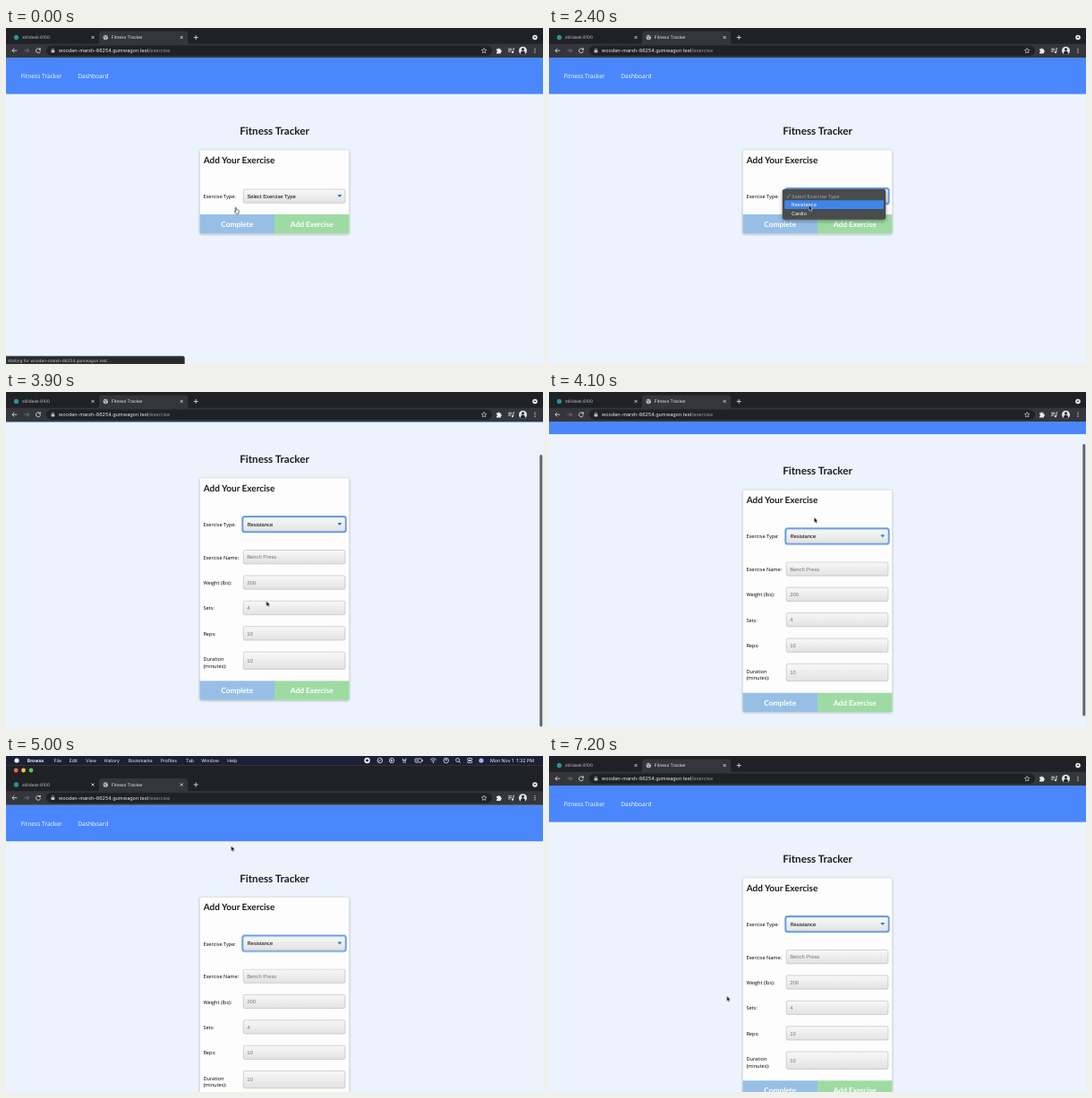
Animation of 600 by 375 pixels, one loop 7300 ms. Source, as an HTML page:

```html
<!DOCTYPE html>
<html lang="en">
<head>
<meta charset="utf-8">
<title>Fitness Tracker</title>
<style>
html, body { margin: 0; width: 100%; height: 100%; overflow: hidden; background: #ecf3fc; }
svg { display: block; width: 600px; height: 375px; text-rendering: geometricPrecision; }

.ui { font-family: Inter, sans-serif; }
.body { font-family: "Open Sans", sans-serif; font-size: 5.6px; }
.head { font-family: Lato, sans-serif; font-weight: 700; }
.ctl { font-family: "Liberation Sans", Arial, sans-serif; font-size: 5.83px; }
.mid { text-anchor: middle; }
.line { fill: none; stroke: #e8eaed; stroke-width: .8; }
.box { fill: url(#face); stroke: #a9a9a9; stroke-width: .5; }

/* One loop is 7300 ms, so 100 ms is 1.37 % */
.anim { animation: 7.3s step-end infinite; }
#win { animation-name: reveal; }
#page { animation-name: scroll; }
#thumb { animation-name: thumb; }
#cursor { animation-name: move; }
#hand { animation-name: hand; }
#arrow { animation-name: arrow; }
#status { animation-name: status; }
#ring { animation-name: ring; }
#popup { animation-name: popup; }
#hover { animation-name: hover; }
#card { animation-name: card; }
#buttons { animation-name: buttons; }
.before { animation-name: before; }
.after { animation-name: after; }

@keyframes move {
  0% { transform: translate(255px, 199.5px); }
  2.73% { transform: translate(262px, 206px); }
  4.1% { transform: translate(262px, 206px); animation-timing-function: steps(8); }
  15.06% { transform: translate(283px, 187px); animation-timing-function: steps(5); }
  21.91% { transform: translate(286px, 190px); }
  23.28% { transform: translate(286px, 190px); animation-timing-function: steps(7); }
  32.87% { transform: translate(290px, 197.5px); }
  34.24% { transform: translate(290px, 197.5px); animation-timing-function: steps(5); }
  41.09% { transform: translate(290.5px, 214px); }
  43.83% { transform: translate(290.5px, 215.5px); animation-timing-function: steps(5); }
  50.68% { transform: translate(290.5px, 233px); }
  53.42% { transform: translate(290.5px, 233px); animation-timing-function: steps(5); }
  60.27% { transform: translate(304px, -.5px); animation-timing-function: steps(2); }
  63.01% { transform: translate(300px, 0); animation-timing-function: steps(4); }
  68.49% { transform: translate(251.2px, 100px); animation-timing-function: steps(2); }
  71.23% { transform: translate(226px, 176px); }
  83.56% { transform: translate(226px, 176px); animation-timing-function: steps(6); }
  91.78% { transform: translate(196px, 274px); }
  94.52% { transform: translate(196px, 274px); animation-timing-function: steps(3); }
  98.63%, 100% { transform: translate(198.3px, 267.5px); }
}
@keyframes scroll {
  0% { transform: none; }
  43.83% { transform: translateY(0); animation-timing-function: steps(2); }
  46.57% { transform: translateY(-22px); animation-timing-function: steps(3); }
  50.68% { transform: translateY(-40px); }
  54.79% { transform: translateY(-40px); animation-timing-function: steps(3); }
  58.9% { transform: translateY(0); }
  60.27% { transform: translateY(1px); }
  61.64%, 100% { transform: none; }
}
@keyframes thumb {
  0% { transform: none; opacity: 0; }
  43.83% { transform: translateY(0); opacity: 0; }
  45.2% { transform: translateY(10px); opacity: 1; animation-timing-function: steps(4); }
  50.68% { transform: translateY(36px); opacity: 1; }
  54.79% { transform: translateY(36px); opacity: 1; animation-timing-function: steps(3); }
  58.9% { transform: translateY(0); opacity: 1; }
  63.01%, 100% { transform: none; opacity: 0; }
}
@keyframes reveal {
  0% { transform: none; }
  60.27% { transform: translateY(0); animation-timing-function: steps(2); }
  63.01% { transform: translateY(21.5px); }
  68.49% { transform: translateY(21.5px); animation-timing-function: steps(2); }
  71.23%, 100% { transform: translateY(0); }
}
@keyframes hand { 0% { opacity: 1; } 6.84%, 100% { opacity: 0; } }
@keyframes arrow { 0% { opacity: 0; } 6.84%, 100% { opacity: 1; } }
@keyframes status { 0% { opacity: 1; } 6.84%, 100% { opacity: 0; } }
@keyframes ring { 0% { opacity: 0; } 17.8%, 100% { opacity: 1; } }
@keyframes popup { 0% { opacity: 0; } 17.8% { opacity: 1; } 36.98% { opacity: .5; } 38.35%, 100% { opacity: 0; } }
@keyframes hover { 0% { opacity: 0; } 26.02% { opacity: 1; } 35.61% { opacity: 0; } 36.98%, 100% { opacity: 1; } }
@keyframes before { 0% { opacity: 1; } 38.35%, 100% { opacity: 0; } }
@keyframes after { 0% { opacity: 0; } 38.35%, 100% { opacity: 1; } }
@keyframes card { 0% { height: 93.5px; } 38.35%, 100% { height: 247.7px; } }
@keyframes buttons { 0% { transform: none; } 38.35%, 100% { transform: translateY(154.2px); } }
</style>
</head>
<body>
<svg viewBox="0 0 600 375">
  <defs>
    <linearGradient id="face" x2="0" y2="1">
      <stop offset="0" stop-color="#f8f8f8"/>
      <stop offset="1" stop-color="#e2e2e2"/>
    </linearGradient>
    <filter id="soft" x="-20%" y="-20%" width="140%" height="140%">
      <feDropShadow dx="0" dy=".7" stdDeviation="1" flood-opacity=".28"/>
    </filter>
    <filter id="deep" x="-20%" y="-40%" width="140%" height="190%">
      <feDropShadow dx="0" dy="2" stdDeviation="2.2" flood-opacity=".35"/>
    </filter>
    <path id="close" class="line" d="M-1.5-1.5l3 3m0-3l-3 3"/>
  </defs>
  <rect width="600" height="375" fill="#ecf3fc"/>

  <g id="win" class="anim">
    <g id="page" class="anim">
      <rect y="33" width="600" height="40.7" fill="#4a87fc"/>
      <g class="body" fill="#fff" style="font-size:6.667px">
        <text x="16.7" y="56.3">Fitness Tracker</text>
        <text x="80.2" y="56.3">Dashboard</text>
      </g>
      <text class="head mid" x="300" y="119" font-size="11.667" fill="#1b1c1d">Fitness Tracker</text>

      <rect id="card" class="anim" x="216.5" y="136" width="167" height="93.5" rx="1.7" fill="#fdfdfd" stroke="#c9cdd2" stroke-width=".4" filter="url(#soft)"/>
      <text class="head" x="220.7" y="150.5" font-size="10" fill="#1b1c1d">Add Your Exercise</text>

      <g class="body">
        <text x="220.4" y="190">Exercise Type:</text>
        <g class="anim after">
          <text x="220.4" y="226.7">Exercise Name:</text>
          <text x="220.4" y="255">Weight (lbs):</text>
          <text x="220.4" y="283.3">Sets:</text>
          <text x="220.4" y="311.6">Reps:</text>
          <text x="220.4" y="340.3">Duration</text>
          <text x="220.4" y="347.9">(minutes):</text>
        </g>
      </g>

      <g class="ctl">
        <rect id="ring" class="anim" x="264.4" y="179.2" width="115.2" height="16.9" rx="2.4" fill="none" stroke="#5c9df0" stroke-width="2.2"/>
        <rect class="box" x="265.2" y="180" width="113.7" height="15.3" rx="1.8"/>
        <path d="M370.3 186.1h5l-2.5 2.9z" fill="#1a7bd8"/>
        <text class="anim before" x="269.4" y="189.8">Select Exercise Type</text>
        <text class="anim after" x="269.4" y="189.8">Resistance</text>
        <g class="anim after" fill="#757575">
          <rect class="box" x="265.2" y="216.5" width="113.7" height="15.3" rx="1.8"/>
          <rect class="box" x="265.2" y="244.9" width="113.7" height="15.3" rx="1.8"/>
          <rect class="box" x="265.2" y="273.3" width="113.7" height="15.3" rx="1.8"/>
          <rect class="box" x="265.2" y="301.7" width="113.7" height="15.3" rx="1.8"/>
          <rect class="box" x="265.2" y="330" width="113.7" height="19.4" rx="1.8"/>
          <text x="269.2" y="226.3">Bench Press</text>
          <text x="269.2" y="254.7">200</text>
          <text x="269.2" y="283.1">4</text>
          <text x="269.2" y="311.5">10</text>
          <text x="269.2" y="341.8">10</text>
        </g>
      </g>

      <g id="buttons" class="anim head mid" font-size="8.333" fill="#fff">
        <path d="M216.5 208H300v21.6h-81.8a1.7 1.7 0 0 1-1.7-1.7z" fill="#97bfe6"/>
        <path d="M300 208h83.5v19.9a1.7 1.7 0 0 1-1.7 1.7H300z" fill="#9edba3"/>
        <text x="258.2" y="222">Complete</text>
        <text x="341.7" y="222">Add Exercise</text>
      </g>
    </g>

    <rect id="thumb" class="anim" x="596.3" y="34" width="3" height="303.5" rx="1.5" fill="#5f6670"/>

    <g id="popup" class="anim ui" font-size="5.45" fill="#fff">
      <rect x="261" y="180" width="115" height="33.6" rx="2.3" fill="#4a4b4d" stroke="#38393b" stroke-width=".4" filter="url(#deep)"/>
      <rect id="hover" class="anim" x="263.2" y="192.2" width="110.8" height="9.7" rx="1" fill="#3d85ea"/>
      <path class="line" d="M265.6 187.9l1.4 1.7 2.4-4.2" style="stroke:#a5a6a8;stroke-width:.7"/>
      <text x="271" y="189.6" fill="#a5a6a8">Select Exercise Type</text>
      <text x="271" y="199.1">Resistance</text>
      <text x="271" y="208.7">Cardio</text>
    </g>

    <!-- Menu bar and window buttons, above the stage until revealed -->
    <g class="ui" transform="translate(0 -21.5)" font-size="5.1" fill="#f1f2f5">
      <rect y="-4" width="600" height="14.8" fill="#1b2038"/>
      <rect y="10.5" width="600" height="12" fill="#202124"/>
      <circle cx="12" cy="5" r="2.6"/>
      <text x="23.8" y="6.9" font-weight="700">Browse</text>
      <text x="53.5" y="6.9">File</text>
      <text x="70.7" y="6.9">Edit</text>
      <text x="89" y="6.9">View</text>
      <text x="109.6" y="6.9">History</text>
      <text x="136.7" y="6.9">Bookmarks</text>
      <text x="172.7" y="6.9">Profiles</text>
      <text x="201" y="6.9">Tab</text>
      <text x="218.3" y="6.9">Window</text>
      <text x="247.2" y="6.9">Help</text>
      <text x="541" y="6.9" font-size="5.3" xml:space="preserve">Mon Nov 1  1:32 PM</text>
      <circle cx="403.5" cy="5" r="3.2"/>
      <rect x="402.2" y="3.7" width="2.6" height="2.6" rx=".5" fill="#1b2038"/>
      <g class="line">
        <circle cx="417.8" cy="5" r="2.8"/><path d="M416 6.3l3.6-2.6"/>
        <circle cx="431" cy="5" r="2.7"/><path d="M430.3 3.8l1.7 1.2-1.7 1.2z"/>
        <path d="M443.3 2.5v2h3.6v-2m-2.8 2v3.4m2 0V4.5"/>
        <rect x="457" y="3" width="7.5" height="4" rx="1"/><path d="M465.6 4.2v1.6M458.4 5h3"/>
        <path d="M474 4q3.4-3 6.8 0m-5.4 1.5q2-1.7 4 0"/>
        <circle cx="491.7" cy="5" r="2.8"/><circle cx="491.7" cy="4.2" r=".8"/>
        <circle cx="504.6" cy="4.5" r="2"/><path d="M506 6l1.8 1.8"/>
        <rect x="515.6" y="2.5" width="5.2" height="2" rx="1"/><rect x="515.6" y="5.6" width="5.2" height="2" rx="1"/>
      </g>
      <circle cx="477.4" cy="7.1" r=".8"/>
      <circle cx="531" cy="5" r="2.6" fill="#a9b4dc"/>
      <circle cx="11.2" cy="16" r="2.4" fill="#ec6a5e"/>
      <circle cx="19.5" cy="16" r="2.4" fill="#f4be4f"/>
      <circle cx="28" cy="16" r="2.4" fill="#61c554"/>
    </g>

    <!-- Tabs and toolbar -->
    <g class="ui" fill="#e8eaed">
      <rect width="600" height="33" fill="#202124"/>
      <path d="M101 18q3 0 3-3V6.500q0-3 3-3h93q3 0 3 3V15q0 3 3 3z" fill="#35363a"/>
      <rect y="17.700" width="600" height="15.300" fill="#35363a"/>
      <rect x="45" y="19.400" width="498" height="11.600" rx="5.800" fill="#202124"/>
      <circle cx="11.500" cy="10.500" r="2.700" fill="#2a8f9c"/>
      <text x="18" y="12.300" font-size="4.850" fill="#bdc1c6">stilldesk:8100</text>
      <circle cx="111.300" cy="10.500" r="2.700" fill="#bdc1c6"/>
      <path d="M109.300 9.600q1.800-.2 1.700 1t1 1.800m.2-4.100q-.4 1.300 1.400 1.300" fill="none" stroke="#35363a" stroke-width=".7"/>
      <text x="117.800" y="12.300" font-size="4.850">Fitness Tracker</text>
      <use href="#close" x="97" y="10.500"/>
      <use href="#close" x="196.200" y="10.500"/>
      <path class="line" d="M209.700 10.500h5m-2.500-2.500v5"/>
      <circle cx="591" cy="10.500" r="2.800"/>
      <path d="M589.500 9.800h3l-1.500 1.800z" fill="#202124"/>

      <path class="line" d="M12.300 25.200H7m2.300-2.400L6.900 25.200l2.400 2.400"/>
      <path class="line" d="M20.300 25.200h5.300m-2.300-2.400l2.400 2.400-2.400 2.400" style="stroke:#7c7f84"/>
      <path class="line" d="M37.900 23.600a2.500 2.500 0 1 0 .6 1.900"/>
      <path d="M38.700 22.100v2.500h-2.500z"/>
      <rect x="50.500" y="24.600" width="3.800" height="2.900" rx=".4" fill="#bdc1c6"/>
      <path class="line" d="M51.300 24.800v-1a1.100 1.100 0 0 1 2.200 0v1" style="stroke:#bdc1c6;stroke-width:.6"/>
      <text x="58.800" y="27.200" font-size="5.500">wooden-marsh-86254.gumwagon.test<tspan fill="#9aa0a6">/exercise</tspan></text>

      <path class="line" d="M534.200 22.400l.8 1.900 2 .2-1.500 1.400.4 2-1.700-1-1.700 1 .4-2-1.500-1.400 2-.2z" style="stroke-width:.6"/>
      <path d="M548 23.600h1.500a1 1 0 0 1 2 0h1.400v1.500a1 1 0 0 1 0 2v1.300H548v-1.500a.9.900 0 0 0 0-1.800z"/>
      <path class="line" d="M561.200 23.200h4m-4 1.600h4m-4 1.600h2.400m3.300.7v-4.300h1.300"/>
      <circle cx="565.900" cy="27.200" r="1.100"/>
      <circle cx="577.500" cy="25.300" r="4.500" fill="#dfe3e7"/>
      <circle cx="577.500" cy="23.800" r="1.500" fill="#24262b"/>
      <path d="M574.900 28.900q.2-3.400 2.600-3.400t2.600 3.400q-2.600 1.700-5.200 0z" fill="#24262b"/>
      <circle cx="591" cy="23.100" r=".65"/><circle cx="591" cy="25.200" r=".65"/><circle cx="591" cy="27.300" r=".65"/>
    </g>
  </g>

  <g id="status" class="anim ui">
    <path d="M0 366.200h197.500q2 0 2 2V375H0z" fill="#292a2d" stroke="#515357" stroke-width=".4"/>
    <text x="1.900" y="372.500" font-size="4.700" fill="#c3c6ca">Waiting for wooden-marsh-86254.gumwagon.test...</text>
  </g>

  <g id="cursor" class="anim" stroke-linejoin="round">
    <path id="arrow" class="anim" d="M.3.200v6.100l1.400-1.300.9 2.100 1.100-.5-.9-2h1.800z" fill="#000" stroke="#fff" stroke-width=".5"/>
    <path id="hand" class="anim" d="M1.100 1q.5-.8 1 0l.5 2.300 2 .5q.9.300.7 1.300l-.5 2.700H2.200L.2 5.300q0-.9 1.300 0z" fill="#fff" stroke="#000" stroke-width=".6"/>
  </g>
</svg>
</body>
</html>
```
